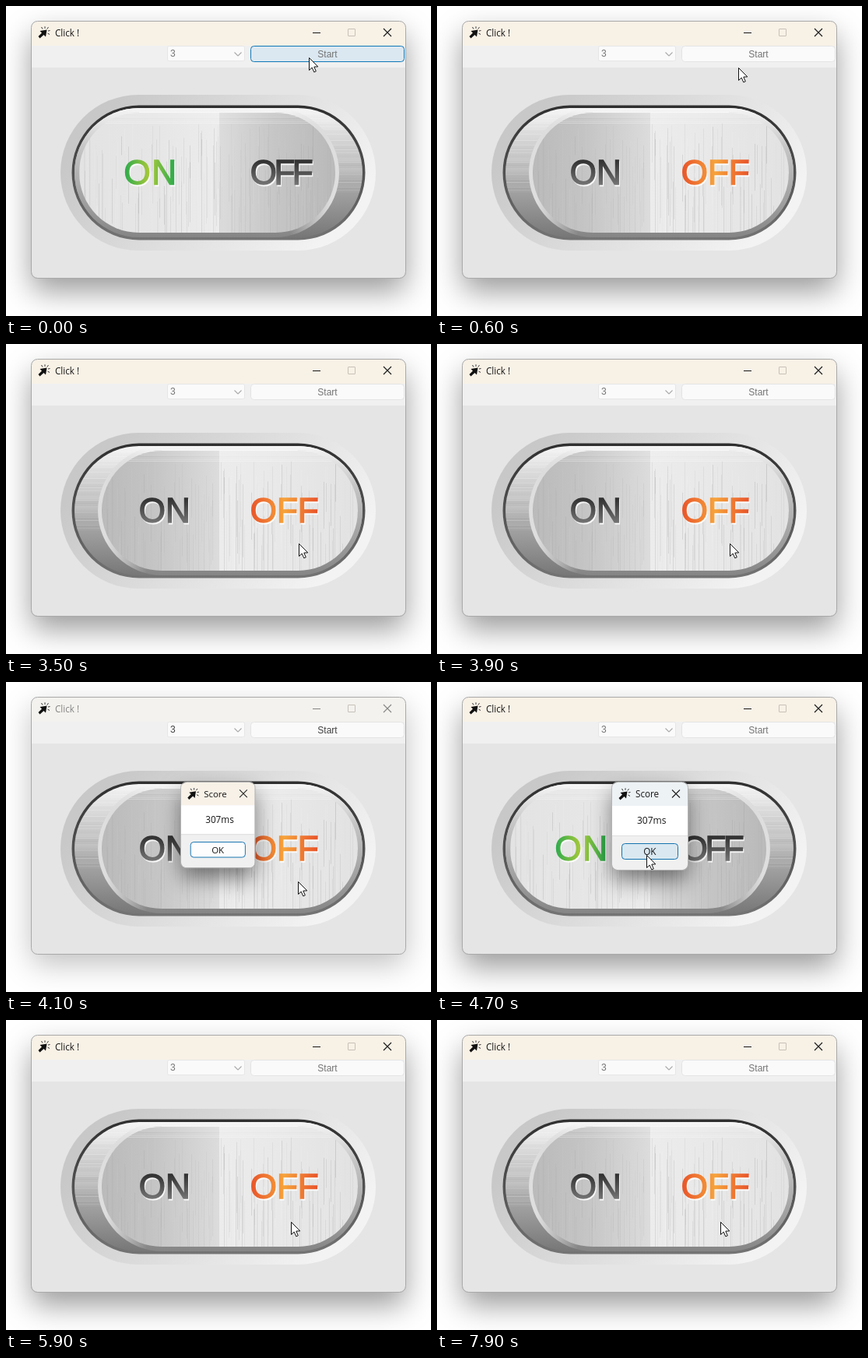
Write an HTML page with a canvas that moves like this. It is 546 by 398 pixels and loops after 8000 ms.

```html
<!DOCTYPE html>
<html lang="en">
<head>
<meta charset="utf-8">
<title>Click !</title>
<style>
html, body { margin: 0; width: 100%; height: 100%; overflow: hidden; background: #fff; }
canvas { display: block; }
</style>
</head>
<body>
<canvas id="stage" width="546" height="398"></canvas>
<script>
const W = 546, H = 398, LOOP = 8000, STEP = 100;
const UI = '"Open Sans", "Noto Sans", sans-serif';
const FORM = '"Liberation Sans", Arial, sans-serif';
const stage = document.getElementById('stage').getContext('2d');

// time, x, y of the pointer tip
const POINTER = [
  [0, 389, 66], [500, 389, 66], [700, 385, 92], [1000, 374, 162], [1400, 363, 245],
  [1500, 363, 261], [1600, 363, 261], [1800, 376, 256], [3900, 376, 256],
  [4000, 375, 256], [4100, 375, 256], [4500, 269, 222], [4900, 269, 222],
  [5500, 326, 240], [5900, 366, 259], [6300, 364, 259], [LOOP, 364, 259]
];

const between = (t, a, b) => t >= a && t < b;

function pointerAt(t) {
  const i = POINTER.findIndex(p => p[0] > t);
  const [t0, x0, y0] = POINTER[i - 1], [t1, x1, y1] = POINTER[i];
  const k = (t - t0) / (t1 - t0);
  return [Math.round(x0 + (x1 - x0) * k), Math.round(y0 + (y1 - y0) * k)];
}

function randomizer(seed) {
  return () => (seed = (seed * 16807) % 2147483647) / 2147483647;
}

function box(c, x0, y0, x1, y1, r, fill, line) {
  c.beginPath();
  c.roundRect(x0, y0, x1 - x0, y1 - y0, r);
  if (fill) { c.fillStyle = fill; c.fill(); }
  if (line) { c.strokeStyle = line; c.lineWidth = 1; c.stroke(); }
}

function lines(c, color, width, ...segments) {
  c.strokeStyle = color;
  c.lineWidth = width;
  c.beginPath();
  for (const [x0, y0, x1, y1] of segments) { c.moveTo(x0, y0); c.lineTo(x1, y1); }
  c.stroke();
}

function polygon(c, points) {
  c.beginPath();
  points.forEach(([x, y]) => c.lineTo(x, y));
  c.closePath();
}

function label(c, text, x, y, font, color, align = 'left') {
  c.font = font;
  c.fillStyle = color;
  c.textAlign = align;
  c.fillText(text, x, y);
}

function ramp(c, x0, y0, x1, y1, ...stops) {
  const g = c.createLinearGradient(x0, y0, x1, y1);
  stops.forEach(([at, color]) => g.addColorStop(at, color));
  return g;
}

function layer(draw) {
  const canvas = document.createElement('canvas');
  canvas.width = W;
  canvas.height = H;
  draw(canvas.getContext('2d'));
  return canvas;
}

function shadowBox(c, x0, y0, x1, y1, r, blur, drop, alpha) {
  c.save();
  c.shadowColor = `rgba(0,0,0,${alpha})`;
  c.shadowBlur = blur;
  c.shadowOffsetY = drop;
  box(c, x0, y0, x1, y1, r, '#e5e5e5');
  c.restore();
}

function clickIcon(c, x, y) {
  c.save();
  c.translate(x, y);
  c.fillStyle = '#111';
  polygon(c, [[11.5, 4.5], [2.5, 6], [5, 8.5], [0.5, 13], [2.5, 15.5], [7.5, 11], [10, 13.5]]);
  c.fill();
  lines(c, '#333', 1, [6, 3.5, 4.5, 1], [9, 2.8, 9, 0.3], [11.8, 3.4, 13.5, 1.2],
    [13, 6, 15.5, 5.5], [12.5, 9, 15, 10.5]);
  c.restore();
}

function cross(c, x, y, color) {
  lines(c, color, 1.1, [x, y, x + 10, y + 10], [x + 10, y, x, y + 10]);
}

function engraved(c, text, x, spacing, fill) {
  c.font = `44px ${FORM}`;
  c.letterSpacing = spacing + 'px';
  c.textAlign = 'left';
  c.lineWidth = 1.5;
  c.lineJoin = 'miter';
  for (const [shift, color] of [[1.2, 'rgba(255,255,255,.75)'], [0, fill]]) {
    c.fillStyle = c.strokeStyle = color;
    c.fillText(text, x + shift, 229.3 + shift);
    c.strokeText(text, x + shift, 229.3 + shift);
  }
  c.letterSpacing = '0px';
}

function brush(c, left, on) {
  const rnd = randomizer(71);
  for (let i = 0; i < 300; i++) {
    const x = Math.floor(left + rnd() * 330), bright = on === (x < 274);
    const y = 150 + rnd() * 110, shade = rnd() < 0.5 ? 255 : 70;
    c.fillStyle = `rgba(${shade},${shade},${shade},${(bright ? 0.13 : 0.06) * rnd()})`;
    c.fillRect(x, y, 1, 20 + rnd() * 120);
  }
  for (let y = 138; y < 152; y += 2) {
    c.fillStyle = `rgba(255,255,255,${0.3 * rnd()})`;
    c.fillRect(left, y, 330, 1);
  }
}

function drawToggle(c, on) {
  box(c, 70, 114, 475, 314, 100,
    ramp(c, 150, 114, 395, 314, [0, '#c8c8c8'], [0.5, '#dedede'], [1, '#f3f3f3']));
  box(c, 84.5, 127.5, 461.5, 300.5, 86.5, ramp(c, 0, 128, 0, 300, [0, '#2f2f2f'], [1, '#747474']));
  box(c, 88, 131, 458, 297, 83,
    ramp(c, 0, 131, 0, 297, [0, '#f5f5f5'], [0.2, '#dadada'], [0.55, '#adadad'], [1, '#777']));

  c.save();
  box(c, 88, 131, 458, 297, 83);
  c.clip();
  const rnd = randomizer(19);
  for (let y = 132; y < 240; y += 2) {
    c.fillStyle = `rgba(255,255,255,${0.3 * rnd()})`;
    c.fillRect(88, y, 370, 1);
  }
  c.restore();

  const rim = on ? 88 : 118, face = on ? 94 : 123;
  box(c, rim, 131, rim + 340, 297, 83,
    ramp(c, 0, 131, 0, 297, [0, '#f6f6f6'], [0.3, '#c6c6c6'], [0.7, '#a2a2a2'], [1, '#858585']));
  const [fadeFrom, fadeTo] = on ? [365, 418] : [181, 128];
  box(c, rim, 131, rim + 340, 297, 83,
    ramp(c, fadeFrom, 0, fadeTo, 0, [0, 'rgba(222,222,222,0)'], [1, 'rgba(222,222,222,1)']));

  c.save();
  const seam = (274 - face) / 329;
  const tones = on
    ? [[0, '#e3e3e3'], [0.3, '#e6e6e6'], [seam, '#ececec'], [seam, '#dcdcdc'], [0.76, '#c6c6c6'], [1, '#b9b9b9']]
    : [[0, '#bababa'], [0.2, '#c4c4c4'], [seam, '#dcdcdc'], [seam, '#ececec'], [0.7, '#e8e8e8'], [1, '#e2e2e2']];
  box(c, face, 137, face + 329, 291, 77, ramp(c, face, 0, face + 329, 0, ...tones));
  c.clip();
  brush(c, face, on);
  c.restore();
  lines(c, 'rgba(255,255,255,.7)', 1, [face + 77, 136.5, face + 252, 136.5]);

  const dark = ramp(c, 0, 198, 0, 231, [0, '#303030'], [1, '#777']);
  if (on) {
    engraved(c, 'ON', 151.5, 1.5, ramp(c, 153, 0, 216, 0, [0, '#2fab4c'], [0.5, '#a9c93a'], [1, '#2fab4c']));
    engraved(c, 'OFF', 313.7, -3.5, dark);
  } else {
    engraved(c, 'ON', 170.8, 0, dark);
    engraved(c, 'OFF', 313.7, 0, ramp(c, 315, 0, 400, 0, [0, '#e9552a'], [0.5, '#f6a33b'], [1, '#e9552a']));
  }
}

function drawWindow(c, active) {
  c.fillStyle = '#fff';
  c.fillRect(0, 0, W, H);
  shadowBox(c, 33, 20, 513, 349, 8, 38, active ? 17 : 13, active ? 0.4 : 0.25);
  c.save();
  box(c, 33, 20, 513, 349, 8);
  c.clip();
  c.fillStyle = active ? '#f8f1e6' : '#f3f2ee';
  c.fillRect(33, 20, 480, 31);
  c.fillStyle = '#f0f0f0';
  c.fillRect(33, 51, 480, 28);
  c.restore();
  box(c, 32.5, 19.5, 513.5, 349.5, 8, null, '#a9a9a9');

  const ink = active ? '#161616' : '#858585';
  clickIcon(c, 41, 26);
  label(c, 'Click !', 63, 39, `11.7px ${UI}`, ink);
  lines(c, ink, 1, [394, 34.5, 404, 34.5]);
  box(c, 439.5, 29.5, 448.5, 38.5, 0.5, null, '#c6c1b8');
  cross(c, 485, 29, ink);
}

function drawControls(c, hover, enabled) {
  const ink = enabled ? '#404040' : '#747474';
  box(c, 207.5, 51.5, 306.5, 70.5, 2, '#fafafa', '#e6e6e6');
  label(c, '3', 211, 65, `12px ${FORM}`, ink);
  lines(c, '#aaa', 1.1, [293.5, 59.5, 298, 64], [298, 64, 302.5, 59.5]);
  box(c, 314.5, 51.5, 511.5, 71.5, 4, '#fafafa', '#e4e4e4');
  c.globalAlpha = hover;
  box(c, 314.5, 51.5, 511.5, 71.5, 4, '#dbe8f1', '#1079b8');
  c.globalAlpha = 1;
  label(c, 'Start', 413, 66, `12px ${FORM}`, ink, 'center');
}

function drawDialog(c, closing, hover) {
  shadowBox(c, 225, 129, 322, 241, 7, 28, 13, 0.5);
  c.save();
  box(c, 225, 129, 322, 241, 7);
  c.clip();
  [[129, 30, closing ? '#edf2f5' : '#f7f1e7'], [159, 38, '#fff'], [197, 44, '#f0f0f0']]
    .forEach(([y, h, color]) => { c.fillStyle = color; c.fillRect(225, y, 97, h); });
  lines(c, '#dfdfdf', 1, [225, 197.5, 322, 197.5]);
  c.restore();
  box(c, 224.5, 128.5, 322.5, 241.5, 7, null, '#b4b4b4');
  clickIcon(c, 233, 136);
  label(c, 'Score', 255, 148, `11.7px ${UI}`, '#161616');
  cross(c, 302, 138.5, '#222');
  label(c, '307ms', 257, 182, `12px ${UI}`, '#161616');
  box(c, 237.5, 207.5, 309.5, 227.5, 4, hover ? '#d9e8f1' : '#fdfdfd', '#1473b0');
  label(c, 'OK', 273.3, 222, `11.7px ${UI}`, '#161616', 'center');
}

function drawPointer(c, x, y) {
  c.save();
  c.translate(x + 0.5, y + 0.5);
  polygon(c, [[0, 0], [0, 16], [3.7, 12.6], [6.3, 18.4], [8.8, 17.3], [6.3, 11.6], [11.3, 11.4]]);
  c.fillStyle = '#fff';
  c.fill();
  c.strokeStyle = '#111';
  c.lineWidth = 1;
  c.stroke();
  c.restore();
}

// scale and opacity of the dialog while it opens and closes
function dialogPose(t) {
  if (!between(t, 4000, 4900)) return null;
  if (t < 4100) return [0.93, 0.6];
  if (t < 4200) return [0.975, 1];
  return t < 4800 ? [1, 1] : [0.95, 0.35];
}

const windows = [false, true].map(active => layer(c => drawWindow(c, active)));
const toggles = [false, true].map(on => layer(c => drawToggle(c, on)));

function render(t) {
  const c = stage;
  const active = !between(t, 4000, 4700);
  const on = t < 100 || between(t, 3600, 3900) || between(t, 4700, 4800);
  c.drawImage(windows[+active], 0, 0);
  drawControls(c, Math.max(0, 1 - t / 200), !active);
  c.drawImage(toggles[+on], 0, 0);

  const pose = dialogPose(t);
  if (pose) {
    const [scale, alpha] = pose;
    c.save();
    c.globalAlpha = alpha;
    c.translate(225, 129);
    c.scale(scale, scale);
    c.translate(-225, -129);
    drawDialog(c, t >= 4700, t >= 4500);
    c.restore();
  }
  drawPointer(c, ...pointerAt(t));
}

const start = performance.now();
function tick() {
  const t = (performance.now() - start) % LOOP;
  render(Math.floor(t / STEP) * STEP);
  requestAnimationFrame(tick);
}
tick();
</script>
</body>
</html>
```
